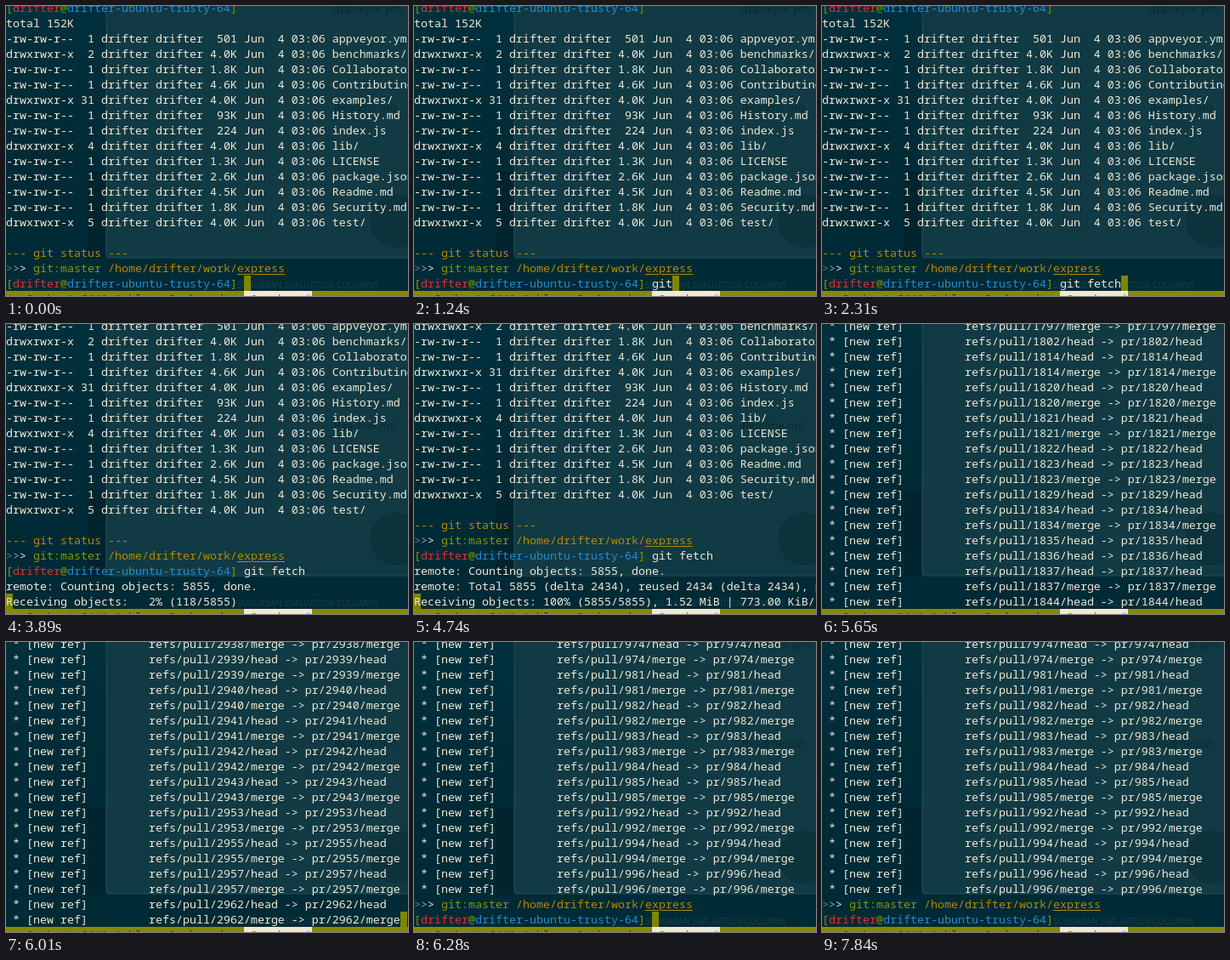
These frames come from a looping animation (473x341 px, 7.99 s). An HTML page:

```html
<!DOCTYPE html>
<html lang="en">
<head>
<meta charset="utf-8">
<title>git fetch</title>
<style>
  html, body { margin: 0; width: 100%; height: 100%; overflow: hidden; background: #002b36; }
  #stage { position: relative; width: 473px; height: 341px; overflow: hidden;
    background: linear-gradient(#01303d, #002a35 60%, #002a36); }
  #stage > * { position: absolute; box-sizing: border-box; }
  pre { margin: 0; white-space: pre; color: #eee8d5;
    font: 13.3333px/18px "Noto Sans Mono", "DejaVu Sans Mono", monospace;
    font-variant-ligatures: none; }
  #screen { left: 0; top: -7px; }
  #cursor { width: 8px; height: 18px; top: 317px; background: #808500; }
  #status { left: 0; top: 335px; width: 473px; height: 18px; background: #858a00; color: #25363a; }
  #status b { position: absolute; left: 280px; width: 80px; height: 18px; font-weight: 400;
    background: #eee8d5; color: #268bd2; }
  .green { color: #859900 } .red { color: #dc322f } .blue { color: #268bd2 }
  .gold { color: #b58900 } .dim { color: #657b83 } .mid { color: #93a1a1 }
  u { text-underline-offset: 2px; text-decoration-thickness: 1px; }
  .shade { left: 97px; top: 195px; width: 20px; height: 102px; background: #01242e; }
  .pane { left: 117px; top: -10px; width: 370px; height: 307px; border-radius: 4px;
    background: #113a44; border: 3px solid #14404a; }
  .disc { left: 428px; top: 222px; width: 62px; height: 62px; border-radius: 50%; background: #0c323c; }
  .ghost { font: 13px/16px "Open Sans", sans-serif; color: #082a33; white-space: nowrap; }
</style>
</head>
<body>
<div id="stage">
  <div class="shade"></div>
  <div class="pane"></div>
  <div class="disc"></div>
  <div class="ghost" style="left:386px;top:-5px">appveyor.yml</div>
  <div class="ghost" style="left:386px;top:111px">Readme.md</div>
  <div class="ghost" style="left:272px;top:320px;font-size:10px;color:#17424d">SUBURBAN EVALUATION COLUMNS</div>
  <div id="cursor"></div>
  <pre id="screen"></pre>
  <pre id="status">   0 ubuntu64/1 1:blog  2:shared<b> 0-zsh   *</b></pre>
</div>
<script>
const LOOP = 7990, ROWS = 19, CELL = 8;
const user = 'drifter';
const paint = (color, text) => `<span class="${color}">${text}</span>`;

const prompt = paint('green', '[') + paint('red', user) + paint('green', '@') +
  paint('blue', user + '-ubuntu-trusty-64') + paint('green', ']') + ' ';
const location_ = paint('dim', '>') + paint('mid', '>') + '> ' + paint('green', 'git:master') + ' ' +
  paint('gold', `/home/${user}/work/<u>express</u>`);

const entry = (links, size, name) => {
  const mode = name.endsWith('/') ? 'drwxrwxr-x' : '-rw-rw-r--';
  return `${mode} ${String(links).padStart(2)} ${user} ${user} ${size.padStart(4)} Jun  4 03:06 ${name}`;
};
const listing = [
  prompt, 'total 152K',
  entry(1, '501', 'appveyor.yml'), entry(2, '4.0K', 'benchmarks/'),
  entry(1, '1.8K', 'Collaborator-Guide.md'), entry(1, '4.6K', 'Contributing.md'),
  entry(31, '4.0K', 'examples/'), entry(1, '93K', 'History.md'),
  entry(1, '224', 'index.js'), entry(4, '4.0K', 'lib/'),
  entry(1, '1.3K', 'LICENSE'), entry(1, '2.6K', 'package.json'),
  entry(1, '4.5K', 'Readme.md'), entry(1, '1.8K', 'Security.md'),
  entry(5, '4.0K', 'test/'), '',
  paint('gold', '--- git status ---'), location_
];

// "12" yields head and merge, "12h" or "12m" only one of them
const refs = spec => spec.split(' ').flatMap(item => {
  const id = parseInt(item), kind = item.slice(-1);
  const kinds = kind === 'h' ? ['head'] : kind === 'm' ? ['merge'] : ['head', 'merge'];
  return kinds.map(k => ` * [new ref]         refs/pull/${id}/${k} -> pr/${id}/${k}`);
});
const refsUpTo = last =>
  refs(Array.from({ length: 12 }, (_, i) => last - Math.round((11 - i) * 2.3) + (i % 3 ? '' : 'h')).join(' '));

const typed = (time, text) => [time, [...listing, prompt + text], 35 + text.length];
const fetched = [...listing, prompt + 'git fetch'];
const counted = [...fetched, 'remote: Counting objects: 5855, done.'];
const totalled = [...counted, 'remote: Total 5855 (delta 2434), reused 2434 (delta 2434), pack-reused 0'];
const receiving = (percent, count, rate = '') =>
  `Receiving objects: ${String(percent).padStart(3)}% (${count}/5855)${rate}`;
const received = [...totalled, receiving(100, 5855, ', 1.52 MiB | 773.00 KiB/s, done.')];
const resolving = (percent, count, tail = '') =>
  `Resolving deltas: ${String(percent).padStart(3)}% (${count}/3144)${tail}`;
const earlyRate = ', 404.00 KiB | 721.00 KiB/s', lateRate = ', 820.00 KiB | 764.00 KiB/s';
const finished = [
  ...refs('974 981 982 983 984h 985 992 994 996'), location_, prompt
];

// [start ms, lines, cursor column or -1 when hidden]
const states = [
  typed(0, ''),
  [560, [...listing, prompt], -1],
  typed(1090, 'gi'), typed(1240, 'git'), typed(1360, 'git '), typed(1790, 'git f'),
  typed(2040, 'git fe'), typed(2190, 'git fet'), typed(2310, 'git fetch'),
  [2870, [...fetched, ''], 0],
  [3300, [...fetched, ''], -1],
  [3890, [...counted, receiving(2, 118)], 0],
  [4040, [...counted, receiving(8, 469)], 0],
  [4160, [...counted, receiving(13, 762)], 0],
  [4310, [...counted, receiving(27, 1581, earlyRate)], 0],
  [4440, [...counted, receiving(46, 2694, lateRate)], 0],
  [4590, [...counted, receiving(71, 4158, lateRate)], 0],
  [4740, received, 0],
  [4860, [...received, resolving(14, 441)], 0],
  [5010, [...received, resolving(68, 2138)], 0],
  [5130, [...received, resolving(100, 3144, ', completed with 900 local objects.'), ''], 0],
  [5410, refsUpTo(1288), -1],
  [5530, refsUpTo(1563), -1],
  [5650, refs('1797m 1802h 1814 1820 1821 1822h 1823 1829h 1834 1835h 1836h 1837 1844h'), -1],
  [5770, refsUpTo(2217), -1],
  [5890, refsUpTo(2594), -1],
  [6010, refs('2938m 2939 2940 2941 2942 2943 2953 2955 2957 2962'), 58],
  [6130, refsUpTo(873), -1],
  [6280, finished, 35],
  [6710, finished, -1],
  [7300, finished, 35],
  [7840, finished, -1]
];

const screenEl = document.getElementById('screen');
const cursorEl = document.getElementById('cursor');
let shown = null;

function draw(now) {
  const time = now % LOOP;
  const state = states.findLast(([start]) => start <= time);
  if (state !== shown) {
    const [, lines, column] = shown = state;
    screenEl.innerHTML = lines.slice(-ROWS).join('\n');
    cursorEl.style.left = column * CELL + 'px';
    cursorEl.hidden = column < 0;
  }
}

const begin = performance.now();
function tick() {
  draw(performance.now() - begin);
  requestAnimationFrame(tick);
}
tick();
</script>
</body>
</html>
```
